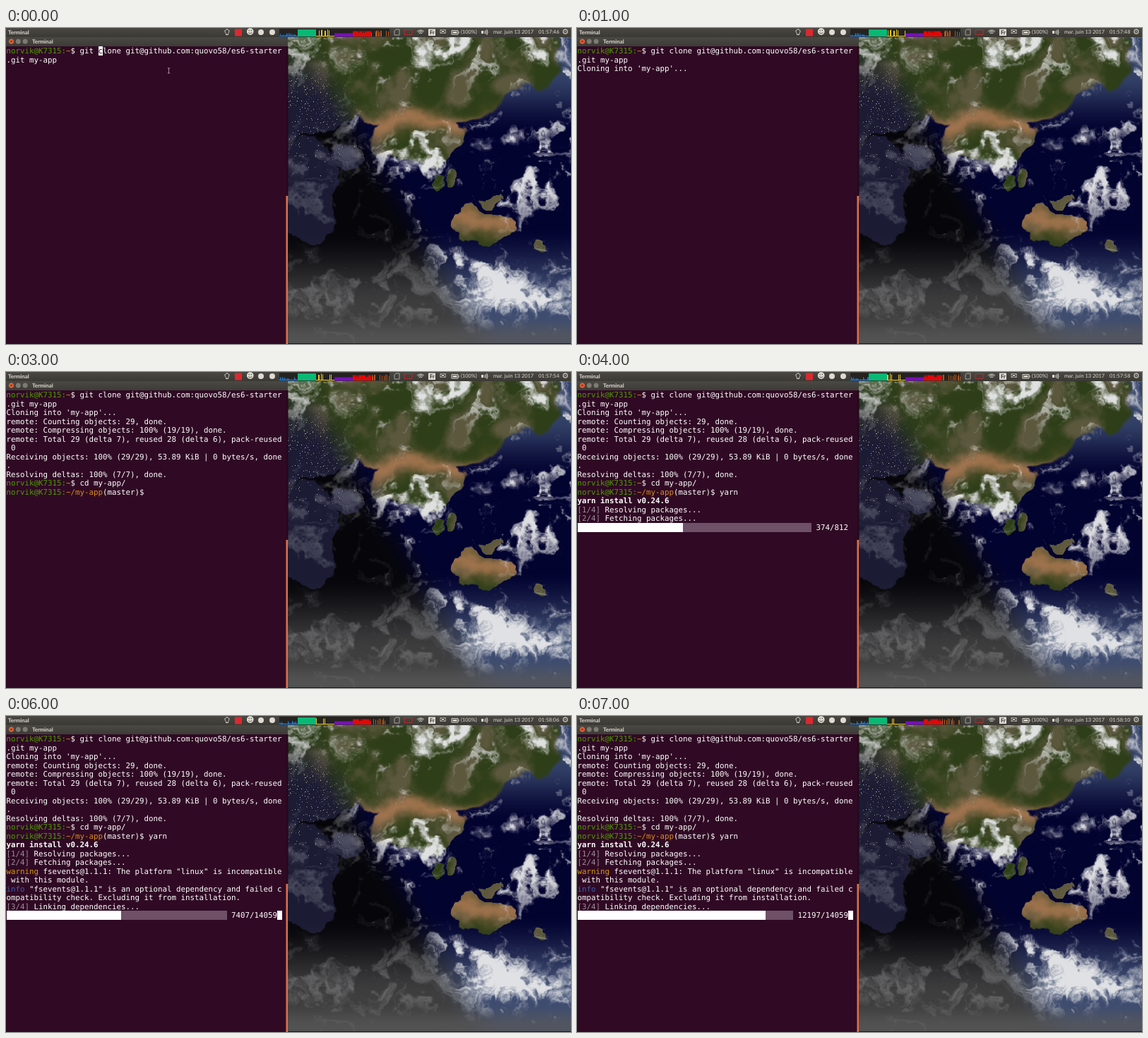
Recreate the animation shown at these times as an HTML page with a canvas. Size 800 px wide and 448 px high, loop 8000 ms.

```html
<!DOCTYPE html>
<html lang="en">
<meta charset="utf-8">
<title>Terminal session</title>
<style>
html, body { margin: 0; width: 100%; height: 100%; overflow: hidden; background: #300a24; text-rendering: geometricPrecision; }
canvas { position: absolute; left: 0; top: 0; }
.ui { position: absolute; font: 7.4px/12px Lato, sans-serif; color: #dfdbd2; white-space: pre; }
.ui b { font-size: 7.8px; }
.icon { font: 11px/12px "DejaVu Sans", sans-serif; }
pre { position: absolute; left: .5px; top: 27.25px; margin: 0; color: #fff; font: 10.8px/12.5px "DejaVu Sans Mono", monospace; }
.user { color: #4e9a06; }
.path { color: #d68a1e; }
.dim { color: #9c8d98; }
.warn { color: #d39a10; }
.info { color: #3f5fae; }
.full { background: #fff; color: #300a24; }
.rest { background: #6e5067; }
</style>
<canvas id="stage" width="800" height="448"></canvas>
<div class="ui" style="left:3px;top:0"><b>Terminal</b></div>
<div class="ui" style="left:37px;top:12.5px"><b>Terminal</b></div>
<div class="ui icon" style="left:340px;top:0">☻</div>
<div class="ui" style="left:600px;top:0;color:#33322e"><b>Fr</b></div>
<div class="ui icon" style="left:614px;top:0">✉</div>
<div class="ui" style="left:644px;top:0">(100%)</div>
<div class="ui" style="left:690px;top:0">mar. juin 13 2017</div>
<div class="ui" style="left:754px;top:0" id="clock"></div>
<div class="ui icon" style="left:787px;top:0">⚙</div>
<pre id="term"></pre>
<script>
const $ = id => document.getElementById(id);
const c = $('stage').getContext('2d');
const pale = '#dfdbd2', aubergine = '#300a24';

const hash = n => { const v = Math.sin(n * 12.9898) * 43758.5453; return v - Math.floor(v); };
const mix = (a, b, t) => a + (b - a) * t;
const blend = (p, q, t) => p.map((v, i) => mix(v, q[i], t));
const smooth = (a, b, v) => {
  const t = Math.min(1, Math.max(0, (v - a) / (b - a)));
  return t * t * (3 - 2 * t);
};

// Fractal value noise on a repeating lattice.
const lattice = Float32Array.from({ length: 65536 }, (_, i) => hash(i + 1));
const cell = (x, y) => lattice[(x & 255) + (y & 255) * 256];
function noise(x, y) {
  const i = Math.floor(x), j = Math.floor(y), u = smooth(0, 1, x - i), v = smooth(0, 1, y - j);
  return mix(mix(cell(i, j), cell(i + 1, j), u), mix(cell(i, j + 1), cell(i + 1, j + 1), u), v);
}
function fractal(x, y) {
  let sum = 0;
  for (let amp = .5; amp > .03; amp /= 2, x = x * 2 + 17, y = y * 2 + 31) sum += amp * noise(x, y);
  return sum;
}

// Land masses: centre and radii.
const lands = [
  [560, 30, 225, 100], [588, 150, 66, 46],                      // Asia
  [425, 110, 75, 40], [484, 176, 27, 22], [418, 225, 53, 73],   // west
  [630, 217, 12, 13], [692, 237, 20, 7], [606, 222, 7, 16],     // islands
  [673, 278, 45, 27], [759, 311, 8, 13]                         // south
];
// Dense cloud fronts: centre, width, height, slope.
const fronts = [[578, 75, 26, 27, -2], [572, 190, 24, 12, 0], [710, 155, 65, 12, -.25], [645, 328, 65, 13, .45], [735, 380, 60, 17, .1]];

function earthColor(x, y) {
  const q = fractal(x / 40, y / 40) - .5, r = fractal(x / 40 + 90, y / 40 + 40) - .5;

  const wx = x + q * 45, wy = y + r * 45;
  const inside = Math.max(...lands.map(([lx, ly, rx, ry]) => 1 - ((wx - lx) / rx) ** 2 - ((wy - ly) / ry) ** 2));
  const land = smooth(-.06, .06, inside);
  const arid = Math.exp(-(((wy - 132) / 15) ** 2)) * smooth(480, 520, x) + Math.exp(-(((wy - 270) / 19) ** 2));
  const soil = blend(blend([46, 62, 24], [92, 88, 62], smooth(.35, .65, q + .5)), [166, 118, 80], Math.min(1, arid) * .9);
  const sea = blend(blend([52, 66, 104], [3, 3, 48], smooth(60, 150, y)), [62, 76, 112], smooth(280, 390, y));
  let color = blend(sea, soil, land);

  // Night falls west of a slanted line; fog greys the far south.
  const edge = 510 + .6 * (y - 150);
  const night = smooth(edge + 25, edge - 45, x) * smooth(0, 110, y);
  let dark = blend([6, 6, 10], [27, 27, 52], land);
  if (land > .5 && cell(x, y) > mix(.95, 1, smooth(90, 230, y))) dark = blend(dark, [215, 205, 170], cell(y, x));
  dark = blend(dark, [62, 62, 63], smooth(285, 400, y));
  color = blend(color, dark, night);

  // Cloud cover follows latitude bands, twisted around the southern cyclone.
  const dx = x - 550, dy = (y - 365) * 1.5, turn = 5 * Math.exp(-Math.hypot(dx, dy) / 24);
  const cx = 550 + dx * Math.cos(turn) - dy * Math.sin(turn), cy = 365 + (dx * Math.sin(turn) + dy * Math.cos(turn)) / 1.5;
  let cover = .1 * Math.cos((y - 20) / 175 * Math.PI * 2) - .04;
  for (const [fx, fy, w, h, slope] of fronts)
    cover += .24 * Math.exp(-(((x - fx) / w) ** 2) - ((y - fy - slope * (x - fx)) / h) ** 2);
  const cloud = smooth(.46, .8, fractal(cx / 48 + 5 * q, cy / 30 + 5 * r) + cover);
  color = blend(color, [232, 233, 234], cloud * mix(.95, .24, night));
  return blend(color, [88, 88, 89], .75 * smooth(405, 440, y));
}

function drawEarth() {
  const left = 399, top = 13, image = c.createImageData(401, 434);
  for (let i = 0; i < image.width * image.height; i++)
    image.data.set([...earthColor(left + i % image.width, top + Math.floor(i / image.width)), 255], i * 4);
  c.putImageData(image, left, top);
}

function rect(color, x, y, w, h) { c.fillStyle = color; c.fillRect(x, y, w, h); }
function dot(color, x, y, r) {
  c.fillStyle = color;
  c.beginPath(); c.arc(x, y, r, 0, 7); c.fill();
}
function line(color, width, d) {
  c.strokeStyle = color; c.lineWidth = width;
  c.stroke(new Path2D(d));
}
// Concentric arcs around a heading, for the wireless and sound icons.
function waves(x, y, heading, spread) {
  for (let r = 3; r < 8; r += 2) {
    c.strokeStyle = pale; c.lineWidth = 1;
    c.beginPath(); c.arc(x, y, r, heading - spread, heading + spread); c.stroke();
  }
}
function bar(y, from, to, width) {
  const g = c.createLinearGradient(0, y, 0, y + 13);
  g.addColorStop(0, from); g.addColorStop(1, to);
  rect(g, 0, y, width, 13);
}

function drawChrome() {
  bar(0, '#4a4843', '#3a3934', 800);
  bar(13, '#4b4943', '#3d3b37', 399);
  rect(aubergine, 0, 26, 399, 422);
  rect(aubergine, 0, 447, 800, 1);
  rect('#26091d', 396.5, 26, 3, 212);
  rect('#dd7048', 396.5, 238, 2.5, 210);
  for (let i = 0; i < 3; i++) dot(i ? '#7d7a72' : '#ea6437', 7.5 + i * 9.8, 19, 3.5);
  line('#4b2116', .9, 'M6 17.5l3 3m0-3l-3 3');

  line(pale, 1, 'M311.5 7.5a3 3 0 1 1 3 0v2h-3z');
  rect('#d92a30', 324, 1.5, 10, 10);
  dot(pale, 361, 6, 4);
  dot(pale, 377, 6, 4);
  line('#a6a29a', 1, 'M550 10V4l2-2h5v8z');
  line('#b52d2d', 1, 'M564 2.5h11v7h-11z');
  waves(587, 10, -Math.PI / 2, .75);
  rect(pale, 598, 1.5, 10, 9.5);
  line(pale, 1, 'M631 3.5h9v5.5h-9zM641 5v2.5');
  rect(pale, 632.5, 5, 6, 2.5);
  rect(pale, 673, 4, 3, 4);
  waves(675, 6, 0, .6);
}

// Load monitors: one colour and one height rule per panel.
const monitors = [
  ['#176fd0', n => 1 + n * n * 4],
  ['#08b873', () => 10],
  ['#e5c51c', n => n > .75 ? n * 10 : 1],
  ['#7d0bc4', () => 4.5],
  ['#e00808', n => n > .8 ? 5 : 7.5],
  ['#b3541e', n => n > .6 ? n * 9 : 0]
];
function drawMonitors(step) {
  const width = 26;
  monitors.forEach(([color, height], k) => {
    const x = 387 + k * width;
    rect('#24231f', x, 1, width, 11);
    for (let i = 0; i < width; i++) {
      const h = height(hash(i + step * 3 + k * 100));
      rect(color, x + i, 12 - h, 1, h);
    }
  });
}

const span = (name, text) => `<span class="${name}">${text}</span>`;
const prompt = (path, tail = '') => span('user', 'norvik@K7315:') + span('path', path) + tail + '$ ';
const stage = (n, text) => span('dim', `[${n}/4]`) + ` ${text}...\n`;

// Output added at each step, one step per second.
const session = [
  '',
  `Cloning into 'my-app'...\n`,
  `remote: Counting objects: 29, done.
remote: Compressing objects: 100% (19/19), done.
remote: Total 29 (delta 7), reused 28 (delta 6), pack-reused
 0
Receiving objects: 100% (29/29), 53.89 KiB | 0 bytes/s, done
.
Resolving deltas: 100% (7/7), done.
` + prompt('~'),
  'cd my-app/\n' + prompt('~/my-app', '(master)'),
  'yarn\n<b>yarn install v0.24.6</b>\n' + stage(1, 'Resolving packages') + stage(2, 'Fetching packages'),
  span('warn', 'warning') + ` fsevents@1.1.1: The platform "linux" is incompatible
 with this module.
` + span('info', 'info') + ` "fsevents@1.1.1" is an optional dependency and failed c
ompatibility check. Excluding it from installation.
` + stage(3, 'Linking dependencies')
];

function progressBar(done, total) {
  const label = `${done}/${total}`, width = 58 - label.length, filled = Math.round(done / total * width);
  return span('full', ' '.repeat(filled)) + span('rest', ' '.repeat(width - filled)) + ' ' + label;
}

let shown = -1;
function render(time) {
  const step = Math.floor(time / 1000) % 8;
  if (step === shown) return;
  shown = step;
  let text = prompt('~') + 'git ' + (step ? 'c' : span('full', 'c')) + 'lone git@github.com:quovo58/es6-starter\n.git my-app\n';
  text += session.slice(0, step + 1).join('');
  if (step === 4) text += progressBar(374, 812);
  if (step > 4) text += progressBar(2617 + 4790 * (step - 5), 14059) + span('full', ' ');
  $('term').innerHTML = text;

  const seconds = 46 + (step < 2 ? step * 2 : step * 4 - 4);
  const two = n => String(n).padStart(2, '0');
  $('clock').textContent = `01:${57 + Math.floor(seconds / 60)}:${two(seconds % 60)}`;
  drawMonitors(step);
  rect(aubergine, 225, 54, 12, 13);
  if (!step) line('#b9aeb6', .8, 'M228.8 57h3.4M230.5 57v7M228.8 64h3.4');
}

drawEarth();
drawChrome();
function tick() {
  render(performance.now());
  requestAnimationFrame(tick);
}
tick();
</script>
</html>
```
